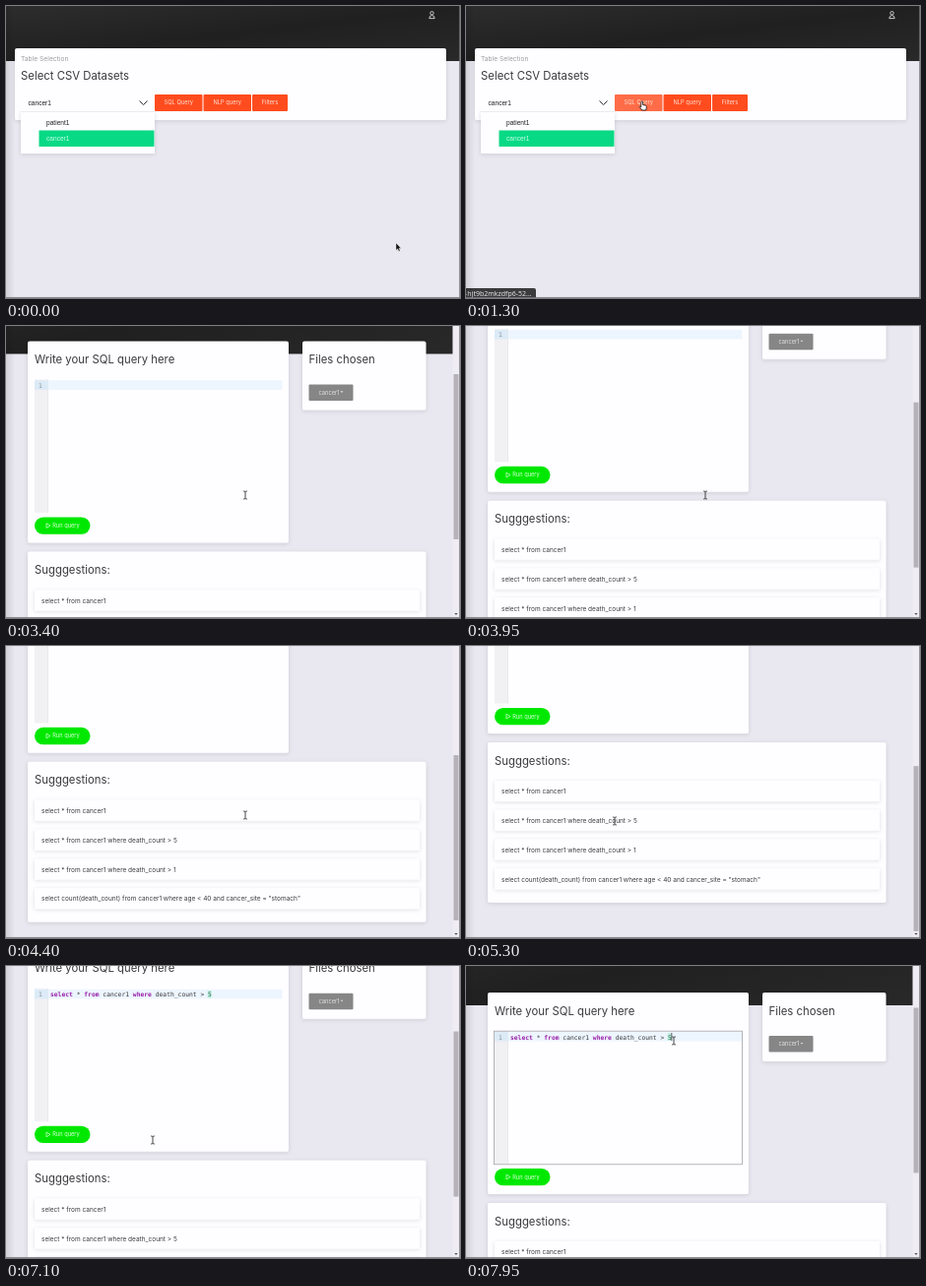
Recreate the animation shown at these times as an HTML page. Size 461x297 px, loop 8000 ms.

```html
<!DOCTYPE html>
<html lang="en">
<head>
<meta charset="utf-8">
<title>Dataset query</title>
<style>
  html, body { margin: 0; width: 100%; height: 100%; overflow: hidden; background: #e9e7ef; }
  svg { display: block; width: 100vw; height: 100vh; }
  text { font-family: Inter, "Open Sans", sans-serif; fill: #3a3a3c; white-space: pre; }
  .head { font-size: 11.35px; }
  .item { font-size: 6.5px; }
  .btn { font-size: 5.7px; text-anchor: middle; fill: #ffe3d8; }
  .field { font: 6.6px "Liberation Sans", Arial, sans-serif; fill: #222; }
  .code { font: 6.34px "DejaVu Sans Mono", monospace; }
  .key { font-weight: bold; fill: #9a1fa8; }
  .status { font: 7px "Noto Sans", sans-serif; fill: #e4e4e4; }
  .card { fill: #fefdff; filter: url(#shadow); }
</style>
</head>
<body>
<svg viewBox="0 0 461 297" preserveAspectRatio="none">
  <defs>
    <linearGradient id="dark" x2="1" y2="1">
      <stop stop-color="#2d2d2d"/><stop offset=".5" stop-color="#202020"/><stop offset="1" stop-color="#292929"/>
    </linearGradient>
    <linearGradient id="edge">
      <stop stop-color="#000" stop-opacity=".1"/><stop offset="1" stop-color="#000" stop-opacity="0"/>
    </linearGradient>
    <filter id="shadow" x="-10%" y="-30%" width="120%" height="160%">
      <feDropShadow dx="0" dy="1" stdDeviation="2" flood-color="#223" flood-opacity=".13"/>
    </filter>
    <g id="user" fill="none" stroke="#eee" stroke-width=".8">
      <circle cx="432.5" cy="7.2" r="1.7"/>
      <path d="M429.8 12.6q0-3 2.7-3t2.7 3z"/>
    </g>
  </defs>
  <rect width="461" height="297" fill="#e9e7ef"/>

  <g id="datasets">
    <rect width="461" height="56" fill="url(#dark)"/>
    <use href="#user"/>
    <rect class="card" x="9" y="43" width="438" height="73" rx="2"/>
    <text x="15" y="56" font-size="6.7" style="fill:#9c9c9f">Table Selection</text>
    <text class="head" x="15" y="74.7">Select CSV Datasets</text>
    <rect class="card" x="15" y="107" width="136" height="43"/>
    <rect x="15" y="90" width="136" height="18" fill="#fefdff"/>
    <path d="M15 107.5H151" stroke="#ddd" stroke-width=".6"/>
    <text class="field" x="22.5" y="101">cancer1</text>
    <path d="M135.5 96.5l4 4 4-4" fill="none" stroke="#333"/>
    <text class="field" x="41" y="120.7">patient1</text>
    <rect x="33.5" y="126.5" width="117" height="16.5" fill="#08d985"/>
    <text class="field" x="41" y="137" style="fill:#c9ffe6">cancer1</text>
    <g id="buttons"></g>
    <g id="status">
      <path d="M0 287H69q2 0 2 2v8H0z" fill="#3b3b3d"/>
      <text class="status" x="-1" y="294.5">-hjt9b2mkzdfp6-52...</text>
    </g>
  </g>

  <g id="query">
    <g id="page">
      <rect width="454" height="110" fill="url(#dark)"/>
      <use href="#user" x="-6"/>
      <text x="224.5" y="45" font-size="16.3" font-weight="700" text-anchor="middle" style="fill:#f5f5f5">SQL Query</text>
      <rect class="card" x="22" y="97" width="265" height="205" rx="2"/>
      <rect class="card" x="301" y="97" width="125.5" height="70" rx="2"/>
      <text class="head" x="29" y="119.7">Write your SQL query here</text>
      <text class="head" x="307.5" y="119.7">Files chosen</text>
      <rect x="307.5" y="141" width="45" height="16.5" rx="1" fill="#868686"/>
      <text class="btn" x="328" y="151.2" style="fill:#e2e2e2">cancer1</text>
      <path d="M339.6 147.9h2.8l-1.4 1.6z" fill="#e2e2e2"/>

      <rect x="29" y="136" width="13.5" height="135.5" fill="#f1f0f3"/>
      <path d="M42.5 136V271.5" stroke="#ddd" stroke-width=".6"/>
      <rect x="29" y="137" width="13.5" height="9.5" fill="#dcebf7"/>
      <rect x="42.8" y="137" width="237.5" height="9.5" fill="#edf5fe"/>
      <text class="code" x="33" y="144.6" style="fill:#8a939c">1</text>
      <g id="sql">
        <rect x="204.6" y="138" width="4" height="8" fill="#c9f0e4"/>
        <text class="code" x="45" y="144.6"><tspan class="key">select</tspan> * <tspan class="key">from</tspan> cancer1 <tspan class="key">where</tspan> death_count &gt; <tspan fill="#116644">5</tspan></text>
      </g>
      <g id="focus" fill="none">
        <rect x="28.5" y="136.2" width="252" height="135.6" stroke="#a3a3a8" stroke-width=".8"/>
        <path d="M208.8 138v8" stroke="#222" stroke-width=".7"/>
      </g>
      <rect x="29" y="276" width="56.5" height="17.3" rx="8.65" fill="#00e800"/>
      <path d="M41 282.2l4 2.4-4 2.4z" fill="none" stroke="#e2ffe2" stroke-width=".7"/>
      <text class="btn" x="61" y="286.6" style="fill:#e2ffe2">Run query</text>

      <rect class="card" x="22" y="311" width="404.5" height="163" rx="2"/>
      <text class="head" x="29" y="333.6">Sugggestions:</text>
      <g id="items"></g>
    </g>
    <rect x="453.5" width="7.5" height="297" fill="#efedf3"/>
    <rect id="thumb" x="454.5" width="5" height="168" fill="#b5b3b9"/>
    <path d="M455.3 292h3.4l-1.7 2z" fill="#555"/>
  </g>

  <rect width="9" height="297" fill="url(#edge)"/>
  <path d="M0 296.5H461M460.6 0V297" stroke="#77767c" stroke-width=".8"/>

  <g id="cursor">
    <path id="arrow" d="M0 0V7.4L1.7 5.9 2.9 8.6 4.2 8 3 5.4H5.2z" fill="#111" stroke="#fff" stroke-width=".4"/>
    <path id="hand" d="M-.2 5V.6q.9-1.2 1.8 0V3.5l3 .7q.8.3.7 1.3L4.8 9H.8L-1.8 5.6q.2-1.2 1.6 0z" fill="#fff" stroke="#111" stroke-width=".8"/>
    <path id="beam" d="M-1.9-4Q0-4.2 0-3.2V3.2Q0 4.2-1.9 4M1.9-4Q0-4.2 0-3.2M0 3.2Q0 4.2 1.9 4" fill="none" stroke="#333" stroke-width=".9"/>
  </g>
</svg>
<script>
const LOOP = 8000, OPEN_QUERY = 1600;
const $ = id => document.getElementById(id);

$('buttons').innerHTML = [['SQL Query', 151, 48.5], ['NLP query', 200.5, 48.5], ['Filters', 250, 36]]
  .map(([label, x, w]) => `<rect x="${x}" y="90" width="${w}" height="17" rx="1" fill="#ff4c1e"/>
    <text class="btn" x="${x + w / 2}" y="100.4">${label}</text>`).join('');

$('items').innerHTML = [
  'select * from cancer1',
  'select * from cancer1 where death_count &gt; 5',
  'select * from cancer1 where death_count &gt; 1',
  'select count(death_count) from cancer1 where age &lt; 40 and cancer_site = "stomach"'
].map((line, i) => `<g transform="translate(0 ${i * 29.8})">
    <rect class="card" x="29" y="350" width="391" height="21" rx="1"/>
    <text class="item" x="36" y="363.2">${line}</text></g>`).join('');

// Keys are [time, ...values]
const scrollKeys = [[2450, 0], [2750, 30], [2850, 30], [3950, 133], [4550, 213],
  [6500, 213], [6650, 191.5], [7350, 70]];
const cursorKeys = [[300, 396, 241], [1150, 178, 97], [1500, 178, 97], [1950, 243, 172],
  [4500, 243, 172], [5300, 151, 178], [6300, 151, 178], [6350, 149, 177],
  [7350, 149, 177], [7950, 211, 76]];

const linear = p => p;
const smooth = p => p * p * (3 - 2 * p);

function track(keys, t, ease) {
  const next = keys.findIndex(k => k[0] > t);
  if (next === 0) return keys[0].slice(1);
  if (next < 0) return keys[keys.length - 1].slice(1);
  const a = keys[next - 1], b = keys[next];
  const p = ease((t - a[0]) / (b[0] - a[0]));
  return a.slice(1).map((v, i) => v + (b[i + 1] - v) * p);
}

const show = (id, on) => $(id).setAttribute('display', on ? 'inline' : 'none');
const move = (id, x, y) => $(id).setAttribute('transform', `translate(${x} ${y})`);
const sqlButton = $('buttons').firstElementChild;

function draw(t) {
  const [scroll] = track(scrollKeys, t, linear);
  const [x, y] = track(cursorKeys, t, smooth);
  const onQuery = t >= OPEN_QUERY;
  const hover = !onQuery && y > 90 && y < 107 && x > 151 && x < 286;

  show('datasets', !onQuery);
  show('query', onQuery);
  show('status', t >= 1200);
  show('sql', t >= 6350);
  show('focus', t >= 7800);
  sqlButton.setAttribute('fill', hover && x < 199.5 ? '#ff6c47' : '#ff4c1e');

  move('page', 0, -scroll);
  move('thumb', 0, 3.5 + scroll * 0.557);
  move('cursor', x, y);
  show('arrow', !onQuery && !hover);
  show('hand', hover);
  show('beam', onQuery);
}

const start = performance.now();
function tick() {
  draw((performance.now() - start) % LOOP);
  requestAnimationFrame(tick);
}
draw(0);
tick();
</script>
</body>
</html>
```
